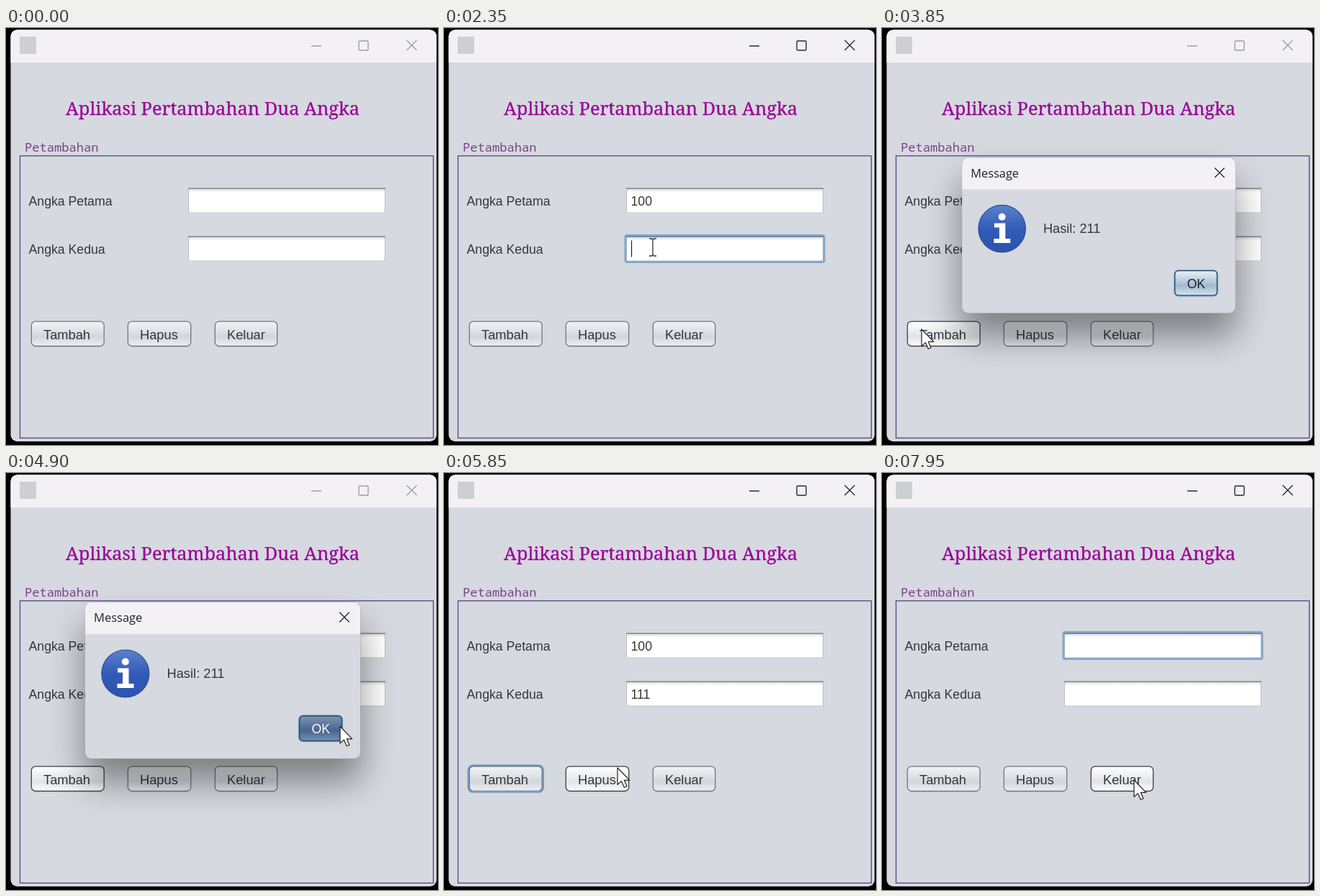
These frames come from a looping animation (600 by 580 pixels, 8000 ms). An HTML page:

```html
<!DOCTYPE html>
<html lang="id">
<head>
<meta charset="utf-8">
<title>Aplikasi Pertambahan Dua Angka</title>
<style>
html, body { margin: 0; width: 100%; height: 100%; overflow: hidden; background: #000; }
svg { display: block; }
text { font-family: "Liberation Sans", Arial, sans-serif; font-size: 17.7px; fill: #34363a; }
.title { font-family: "Noto Serif", serif; font-size: 25.35px; fill: #990096; stroke: #990096; stroke-width: .25px; }
.legend { font-family: "Noto Sans Mono", monospace; font-size: 17.1px; fill: #7b4189; }
.caption { font-family: "Open Sans", sans-serif; font-size: 16.5px; fill: #222; }
.btn { font-size: 18.3px; }
</style>
</head>
<body>
<svg id="stage" width="600" height="580" viewBox="0 0 600 580"></svg>
<script>
const LOOP = 8000;
const FIELDS = [
  { y: 222.5, text: "100", keys: [1350, 1500, 1650], focus: [[750, 2200], [6300, 8000]] },
  { y: 289.5, text: "111", keys: [2500, 2680, 2860], focus: [[2200, 3680]] }
];
const BUTTONS = [
  { x: 35, w: 101.5, label: "Tambah", press: [3560, 3680] },
  { x: 169, w: 88, label: "Hapus", press: [6200, 6300] },
  { x: 290, w: 87, label: "Keluar", press: [0, 0] }
];
const CLEAR = 6300, OPEN = 3700, CLOSE = 5000, OK_PRESS = 4840;
// time, x, y of the pointer
const PATH = [
  [200, 598, 330], [720, 285, 236], [1850, 285, 236], [2150, 290, 305], [2750, 290, 305],
  [3160, 45, 501], [3300, 47, 495], [3420, 55, 419], [4230, 55, 419], [4720, 464, 352.5],
  [5130, 464, 352.5], [5750, 241, 410], [6550, 241, 410], [7100, 349, 430], [7350, 350, 427]
];

const gradient = (id, ...stops) =>
  `<linearGradient id="${id}" x2="0" y2="1">${stops.map(([at, c]) =>
    `<stop offset="${at}" stop-color="${c}"/>`).join("")}</linearGradient>`;

const cross = (x, y, r) => `<path d="M${x - r} ${y - r}l${2 * r} ${2 * r}m0 ${-2 * r}l${-2 * r} ${2 * r}"/>`;

const fieldMarkup = (f, i) => `
  <rect x="253" y="${f.y}" width="274" height="35" fill="#fff"/>
  <rect x="253" y="${f.y}" width="274" height="6" fill="url(#inset)"/>
  <rect x="253.5" y="${f.y + .5}" width="273" height="34" fill="none" stroke="#b9bcc2"/>
  <path d="M253 ${f.y + .7}h274" stroke="#85888d" stroke-width="1.5"/>
  <g id="ring${i}" fill="none">
    <rect x="252" y="${f.y - 1}" width="276" height="37" rx="2" stroke="#82a8cf" stroke-width="3"/>
    <path d="M253 ${f.y + .7}h274" stroke="#657f9b" stroke-width="1.4"/>
  </g>
  <text id="value${i}" x="259.5" y="${f.y + 24.8}"></text>
  <path id="caret${i}" stroke="#222" stroke-width="1.2"/>`;

const buttonMarkup = (b, i) => `
  <rect id="glow${i}" x="${b.x - 1}" y="407" width="${b.w + 2}" height="36.5" rx="6" fill="none" stroke="#7199c6" stroke-width="3"/>
  <path d="M${b.x + 4} 443.4h${b.w - 8}" stroke="#b5b8bd"/>
  <rect id="face${i}" x="${b.x + .3}" y="408.2" width="${b.w - .6}" height="34.2" rx="5.5" stroke-width="1.3"/>
  <text class="btn" x="${b.x + 17}" y="432.5">${b.label}</text>`;

const stage = document.getElementById("stage");
stage.innerHTML = `
<defs>
  ${gradient("inset", [0, "#d3d4d7"], [1, "#fff"])}
  ${gradient("plain", [0, "#f2f3f6"], [.45, "#dcdfe5"], [.6, "#d1d5dc"], [1, "#eceef2"])}
  ${gradient("hover", [0, "#fff"], [.45, "#eaecf0"], [.6, "#e0e3e8"], [1, "#fcfdfe"])}
  ${gradient("down", [0, "#9da6b2"], [.5, "#858f9d"], [1, "#a9b1bc"])}
  ${gradient("okUp", [0, "#e9f0f6"], [.45, "#b4c8da"], [.6, "#a1bad0"], [1, "#d3e2ee"])}
  ${gradient("okDown", [0, "#7f93b2"], [.45, "#536f98"], [.6, "#48658f"], [1, "#7192bb"])}
  ${gradient("info", [0, "#5c82cc"], [.5, "#315bb8"], [1, "#2c53b0"])}
  <filter id="blur" x="-30%" y="-50%" width="160%" height="200%"><feGaussianBlur stdDeviation="25"/></filter>
  <clipPath id="frame"><rect x="6.5" y="2.5" width="591.5" height="572.5" rx="9"/></clipPath>
</defs>
<rect width="600" height="580" fill="#000"/>
<g clip-path="url(#frame)">
  <rect width="600" height="580" fill="#d6d9df"/>
  <rect width="600" height="48" fill="#f4f1f6"/>
  <rect x="19" y="12" width="23" height="24" fill="#ccd0d3"/>
  <g id="controls" fill="none" stroke-width="1.4">
    <path d="M424 25h14"/>
    <rect x="490" y="18" width="13" height="13" rx="1.5"/>
    ${cross(563.5, 24, 7)}
  </g>
  <text class="title" x="83" y="120.7">Aplikasi Pertambahan Dua Angka</text>
  <text class="legend" x="26" y="171.5">Petambahan</text>
  <rect x="19.5" y="177.8" width="574" height="392.5" fill="none" stroke="#4d4783" stroke-width="1.3"/>
  <text x="31.5" y="247.4">Angka Petama</text>
  <text x="31.5" y="314.4">Angka Kedua</text>
  ${FIELDS.map(fieldMarkup).join("")}
  ${BUTTONS.map(buttonMarkup).join("")}
  <g id="dialog">
    <rect x="109" y="211" width="384" height="218" rx="9" fill="#000" opacity=".42" filter="url(#blur)"/>
    <rect x="109.5" y="179.5" width="383" height="218" rx="9" fill="#a5a7ad"/>
    <rect x="110" y="180" width="382" height="217" rx="8.5" fill="#d6d9df"/>
    <path d="M110 224V188.5a8.5 8.5 0 0 1 8.5 -8.5H483.5a8.5 8.5 0 0 1 8.5 8.5V224z" fill="#f4f1f6"/>
    <text class="caption" x="122" y="207.3">Message</text>
    <g fill="none" stroke="#2b2b2b" stroke-width="1.4">${cross(470, 200.6, 6.8)}</g>
    <circle cx="165.8" cy="279" r="33" fill="url(#info)" stroke="#2b4c98" stroke-width="1.2"/>
    <g fill="#fff">
      <circle cx="165.8" cy="262.5" r="5"/>
      <path d="M155 271.5h15.5v21.5h7v6h-23v-6h7.500v-15.5h-7z"/>
    </g>
    <text class="btn" x="223.5" y="285.4">Hasil: 211</text>
    <rect x="405.8" y="336.3" width="62.4" height="38" rx="7" fill="#86abd0"/>
    <rect id="ok" x="407.5" y="338" width="59" height="34.5" rx="5" stroke="#29456e" stroke-width="1.3"/>
    <text id="okText" x="424.5" y="362.4">OK</text>
  </g>
</g>
<path id="arrow" d="M0 0V23.5L5.4 18.6L9.2 27.3L13 25.7L9.3 17.3H16.8Z" fill="#fff" stroke="#222" stroke-width="1.2" stroke-linejoin="round"/>
<path id="beam" d="M-5 -12h3.5l1.5 1.5l1.5 -1.5h3.5M0 -10.5v21M-5 12h3.5l1.5 -1.5l1.5 1.5h3.5" fill="none" stroke="#333" stroke-width="1.3"/>`;

const el = {};
stage.querySelectorAll("[id]").forEach(n => el[n.id] = n);
const set = (id, attrs) => { for (const k in attrs) el[id].setAttribute(k, attrs[k]); };
const show = (id, on) => set(id, { visibility: on ? "visible" : "hidden" });
const within = (t, [a, b]) => t >= a && t < b;
const clamp = v => Math.max(0, Math.min(1, v));

function pointerAt(t) {
  const i = PATH.findIndex(p => p[0] > t);
  if (i < 0) return PATH[PATH.length - 1].slice(1);
  if (i === 0) return [-50, -50];
  const [t0, x0, y0] = PATH[i - 1], [t1, x1, y1] = PATH[i];
  const u = (t - t0) / (t1 - t0), e = u * u * (3 - 2 * u);
  return [x0 + (x1 - x0) * e, y0 + (y1 - y0) * e];
}

function drawField(f, i, t) {
  const count = t < CLEAR ? f.keys.filter(k => t >= k).length : 0;
  const span = f.focus.find(s => within(t, s));
  el["value" + i].textContent = f.text.slice(0, count);
  show("ring" + i, span);
  if (span) {
    const since = Math.max(span[0], ...f.keys.filter(k => k <= t));
    const x = 260.5 + count * 9.9;
    set("caret" + i, { d: `M${x} ${f.y + 6}v23` });
    show("caret" + i, (t - since) % 1000 < 500);
  } else show("caret" + i, false);
}

function drawButton(b, i, t, x, y, modal) {
  const over = modal ? i === 0 : x >= b.x && x <= b.x + b.w && y >= 408 && y <= 442;
  const down = within(t, b.press);
  set("face" + i, {
    fill: `url(#${down ? "down" : over ? "hover" : "plain"})`,
    stroke: over ? "#3c3f44" : "#73777d"
  });
  show("glow" + i, i === 0 && within(t, [CLOSE + 30, CLEAR]));
}

function drawDialog(t) {
  const grow = clamp((t - OPEN) / 200), fade = clamp((t - CLOSE) / 110);
  const scale = 1 - .11 * (1 - grow) ** 2 - .06 * fade;
  const pressed = t >= OK_PRESS;
  show("dialog", t >= OPEN && fade < 1);
  set("dialog", {
    opacity: clamp(grow * 1.8) * (1 - fade),
    transform: `translate(301 288.5) scale(${scale}) translate(-301 -288.5)`
  });
  set("ok", { fill: pressed ? "url(#okDown)" : "url(#okUp)" });
  el.okText.style.fill = pressed ? "#fff" : "#222";
}

function draw(t) {
  const modal = within(t, [OPEN, CLOSE + 30]);
  const [x, y] = pointerAt(t);
  const typing = !modal && x > 253 && x < 527 && FIELDS.some(f => y > f.y && y < f.y + 35);
  set("controls", { stroke: t >= 750 && !modal ? "#2b2b2b" : "#a09ea2" });
  FIELDS.forEach((f, i) => drawField(f, i, t));
  BUTTONS.forEach((b, i) => drawButton(b, i, t, x, y, modal));
  drawDialog(t);
  for (const id of ["arrow", "beam"]) set(id, { transform: `translate(${x} ${y})` });
  show("arrow", !typing);
  show("beam", typing);
}

const start = performance.now();
function tick() {
  draw((performance.now() - start) % LOOP);
  requestAnimationFrame(tick);
}
tick();
</script>
</body>
</html>
```
